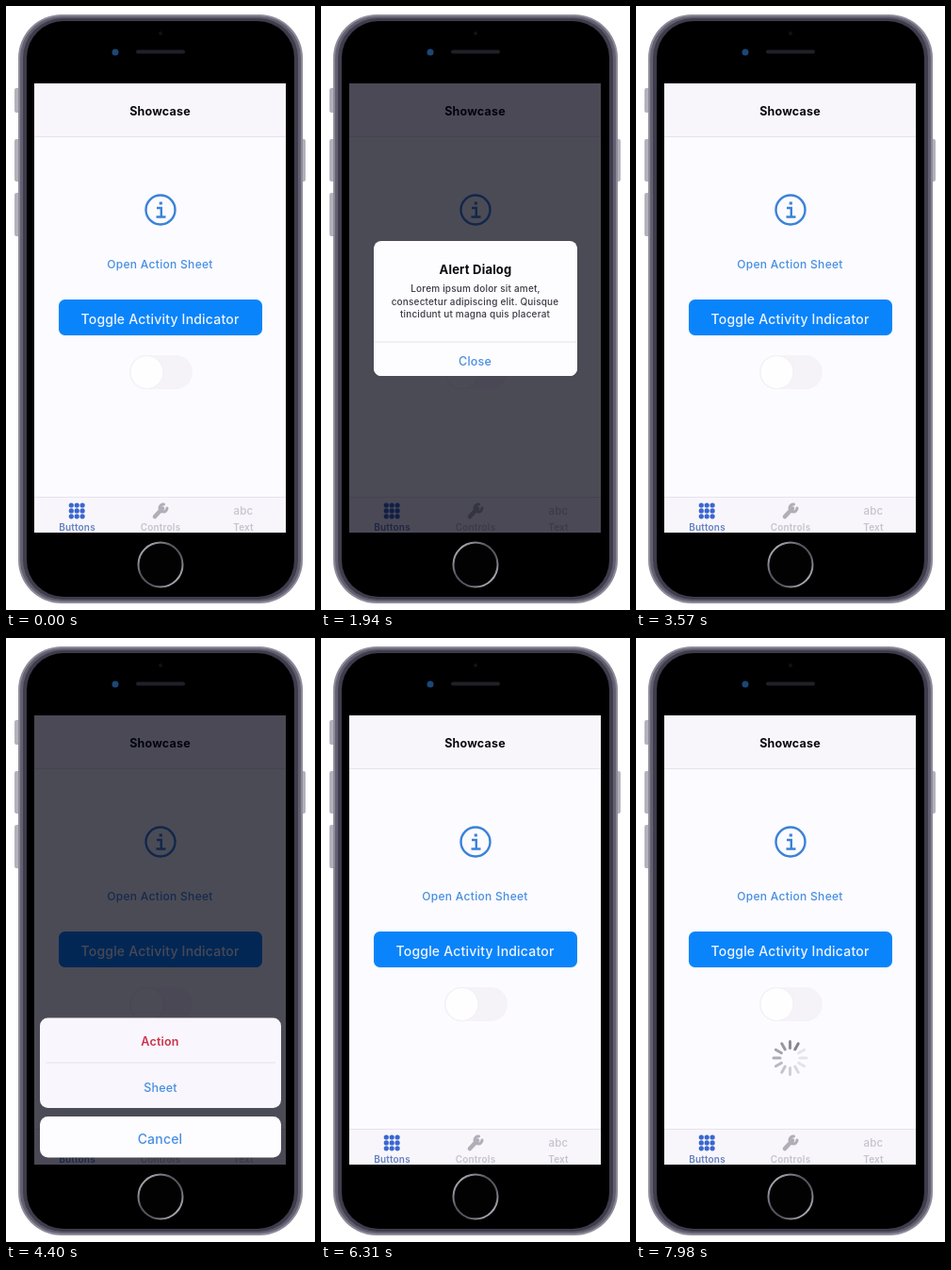
Write an HTML page that moves like this. It is 328x640 px and loops after 8000 ms.

```html
<!DOCTYPE html>
<html lang="en">
<head>
<meta charset="utf-8">
<title>Showcase</title>
<style>
  html, body { margin: 0; width: 100%; height: 100%; overflow: hidden; background: #fff; }
  svg { display: block; width: 328px; height: 640px; }
  text { font: 500 12.5px Inter, Roboto, sans-serif; letter-spacing: .2px; text-anchor: middle; }
  .bold { font-weight: 700; fill: #08080c; }
  .tab { font-size: 10px; font-weight: 600; }
  .body { font-size: 10px; letter-spacing: .18px; fill: #3c3a44; }
  .link { fill: #478fe0; }
  .line { stroke: #e6e3ec; }
</style>
</head>
<body>
<svg viewBox="0 0 328 640">
  <defs>
    <clipPath id="screen"><rect x="30" y="82" width="267" height="476"/></clipPath>
    <linearGradient id="ring" x2="1" y2="1">
      <stop offset="0" stop-color="#d0ced6"/><stop offset=".4" stop-color="#55535c"/>
      <stop offset=".65" stop-color="#5c5a64"/><stop offset="1" stop-color="#e0dee6"/>
    </linearGradient>
  </defs>

  <!-- Phone -->
  <g fill="#b4b1bc">
    <rect x="9" y="87" width="6" height="26" rx="2"/>
    <rect x="9" y="141" width="6" height="45" rx="2"/>
    <rect x="9" y="198" width="6" height="46" rx="2"/>
    <rect x="313" y="141" width="5" height="45" rx="2"/>
  </g>
  <rect x="13" y="9" width="302" height="624" rx="46" fill="#8d8a98"/>
  <rect x="15" y="11" width="298" height="620" rx="44" fill="#625f70"/>
  <rect x="18" y="13" width="292" height="616" rx="42" fill="#3f3c4c"/>
  <rect x="22" y="16" width="284" height="610" rx="39"/>
  <circle cx="164" cy="29" r="2" fill="#111116"/>
  <circle cx="116" cy="49" r="3.5" fill="#1c4776"/>
  <rect x="138" y="46.500" width="52" height="4" rx="2" fill="#211f28"/>
  <circle cx="164" cy="592" r="23.500" fill="#020203" stroke="url(#ring)" stroke-width="2"/>

  <g clip-path="url(#screen)">
    <rect x="30" y="82" width="267" height="476" fill="#fcfbff"/>
    <rect x="30" y="82" width="267" height="56" fill="#f8f6fb"/>
    <path class="line" d="M30 138.500H297"/>
    <text class="bold" x="163.500" y="115.500">Showcase</text>

    <g id="info" fill="none" stroke-width="2.400">
      <circle cx="164" cy="216" r="15.500"/>
      <path d="M160 214H164.800V223M159.500 223.500H169.500"/>
      <path d="M164.300 207.500v3" stroke-width="3.200"/>
    </g>
    <text id="sheetLink" class="link" x="163.500" y="278" style="font-size:12px;letter-spacing:.3px">Open Action Sheet</text>
    <rect id="toggle" x="56" y="311" width="216" height="38" rx="6.500"/>
    <text x="163.500" y="336.500" fill="#f0f4ff" style="font-size:14px">Toggle Activity Indicator</text>
    <rect x="131" y="370" width="67" height="36" rx="18" fill="#f5f3f8"/>
    <circle cx="149.500" cy="388" r="17.500" fill="#fefefe" stroke="#f1eff5"/>
    <g id="spinner" stroke="#85828e" stroke-width="3" stroke-linecap="round"></g>

    <!-- Tab bar -->
    <rect x="30" y="520" width="267" height="38" fill="#f8f6fb"/>
    <path class="line" d="M30 520.500H297"/>
    <g id="dots" fill="#3a67cf"></g>
    <text class="tab" x="75.500" y="555.500" fill="#6480c0">Buttons</text>
    <g fill="none" stroke="#b2aeb8" stroke-linecap="round">
      <path d="M158 541L166 532.500" stroke-width="4.600"/>
      <path d="M167.500 528A4 4 0 1 0 171 532" stroke-width="3"/>
    </g>
    <g fill="#c6c3cc">
      <text class="tab" x="164" y="555.500">Controls</text>
      <text x="252" y="539" style="font-size:11.500px">abc</text>
      <text class="tab" x="252" y="555.500">Text</text>
    </g>

    <rect id="dim" x="30" y="82" width="267" height="476" fill="#00000f"/>

    <g id="alert">
      <rect x="56" y="249" width="216" height="143" rx="8" fill="#fdfcff"/>
      <path id="closeRow" d="M56 356H272V384a8 8 0 0 1-8 8H64a8 8 0 0 1-8-8Z"/>
      <path class="line" d="M56 356H272"/>
      <text class="bold" x="164" y="284" style="font-size:13px">Alert Dialog</text>
      <text class="body" x="164" y="303">Lorem ipsum dolor sit amet,</text>
      <text class="body" x="163.500" y="316.500">consectetur adipiscing elit. Quisque</text>
      <text class="body" x="163.500" y="330">tincidunt ut magna quis placerat</text>
      <text class="link" x="163.500" y="381">Close</text>
    </g>

    <g id="sheet">
      <rect x="36" y="402.500" width="256" height="95.500" rx="8.500" fill="#f9f6fd"/>
      <path class="line" d="M42 450H286"/>
      <text x="163.500" y="431.500" fill="#cc3348" style="font-weight:600">Action</text>
      <text class="link" x="164" y="480.500">Sheet</text>
      <rect id="cancelRow" x="36" y="507" width="256" height="43.500" rx="8.500"/>
      <text class="link" x="163.500" y="535.500" style="font-size:14px">Cancel</text>
    </g>
  </g>
</svg>
<script>
  const LOOP = 8000, SPOKES = 12;
  const ROW = '#fdfcff', ROW_PRESSED = '#e6e3ea';
  const el = id => document.getElementById(id);
  const ease = x => x * x * (3 - 2 * x);
  const ramp = (t, from, to) => ease(Math.min(1, Math.max(0, (t - from) / (to - from))));
  const during = (t, from, to) => t >= from && t < to;

  function add(parent, name, attributes) {
    const node = document.createElementNS('http://www.w3.org/2000/svg', name);
    for (const key in attributes) node.setAttribute(key, attributes[key]);
    return parent.appendChild(node);
  }

  for (let i = 0; i < 9; i++)
    add(el('dots'), 'circle', { cx: 69.3 + i % 3 * 5.9, cy: 529 + Math.floor(i / 3) * 5.9, r: 2.6 });

  const spokes = Array.from({ length: SPOKES }, (_, i) => add(el('spinner'), 'path', {
    d: 'M0-10.500V-17.500', transform: `translate(163.500 445) rotate(${i * 360 / SPOKES})`
  }));

  function draw(t) {
    const alert = ramp(t, 1480, 1740) - ramp(t, 2930, 3180);
    const sheet = ramp(t, 3960, 4300) - ramp(t, 5720, 6040);

    el('info').setAttribute('stroke', during(t, 1180, 1480) ? '#26306a' : '#3a82d8');
    el('sheetLink').setAttribute('opacity', during(t, 3680, 3930) ? .35 : 1);
    el('toggle').setAttribute('fill', during(t, 6980, 7280) ? '#0829ab' : '#0a84fa');

    el('dim').setAttribute('opacity', .7 * Math.max(alert, sheet));
    el('alert').setAttribute('opacity', alert);
    const scale = t < 2900 ? 1.15 - .15 * alert : 1;
    el('alert').setAttribute('transform', `translate(164 320) scale(${scale}) translate(-164 -320)`);
    el('closeRow').setAttribute('fill', during(t, 2680, 3200) ? ROW_PRESSED : ROW);

    el('sheet').setAttribute('transform', `translate(0 ${160 * (1 - sheet)})`);
    el('cancelRow').setAttribute('fill', during(t, 5470, 6050) ? ROW_PRESSED : ROW);

    el('spinner').setAttribute('opacity', t < 7300 ? 0 : 1);
    const lead = Math.floor((t - 7300) / 1000 * SPOKES) + 5;
    spokes.forEach((spoke, i) => {
      const age = ((lead - i) % SPOKES + SPOKES) % SPOKES;
      spoke.setAttribute('opacity', Math.max(.18, 1 - age * .09));
    });
  }

  function frame() {
    draw(performance.now() % LOOP);
    requestAnimationFrame(frame);
  }
  frame();
</script>
</body>
</html>
```
